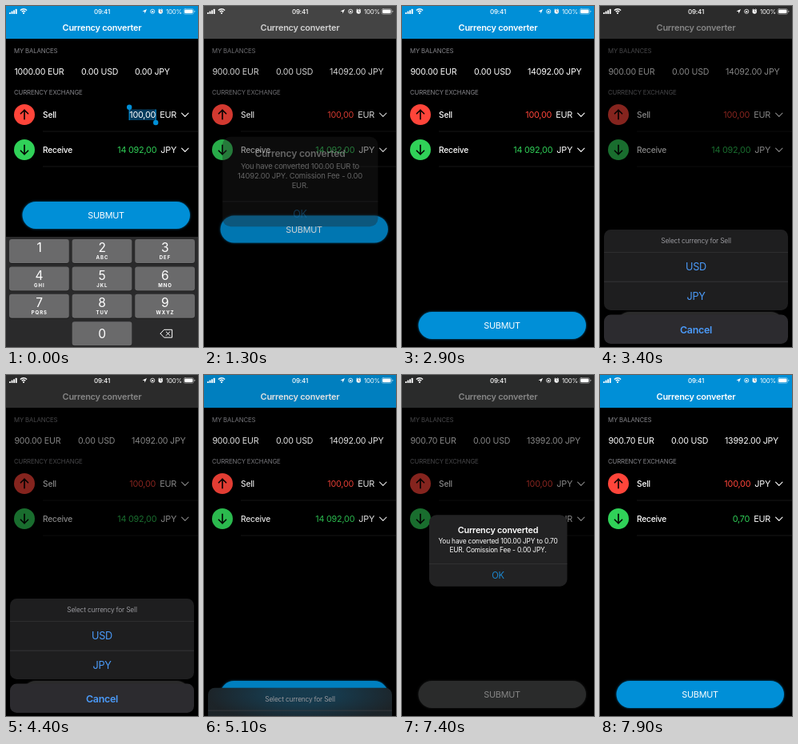
Animation, 240 px wide and 427 px high, one loop 8000 ms. Source, as an HTML page with a canvas:

```html
<!DOCTYPE html>
<html lang="en">
<head>
<meta charset="utf-8">
<title>Currency converter</title>
<style>
html, body { margin: 0; width: 100%; height: 100%; overflow: hidden; background: #000; }
canvas { display: block; width: 240px; height: 427px; }
</style>
</head>
<body>
<canvas id="stage"></canvas>
<script>
const W = 240, H = 427, LOOP = 8000;
const canvas = document.getElementById('stage');
const ctx = canvas.getContext('2d');
const dpr = window.devicePixelRatio || 1;
canvas.width = Math.round(W * dpr);
canvas.height = Math.round(H * dpr);

const BLUE = [0, 143, 215], GRAY = [82, 82, 82];
const RED = '#ff453a', GREEN = '#30d158';

const ramp = (t, a, b) => Math.min(1, Math.max(0, (t - a) / (b - a)));
const inOut = x => x < .5 ? 2 * x * x : 1 - 2 * (1 - x) ** 2;
const out = x => 1 - (1 - x) ** 3;
const rgb = (c, alpha = 1) => `rgba(${c},${alpha})`;
const mix = (a, b, p) => a.map((v, i) => Math.round(v + (b[i] - v) * p));

// Spans are [open start, open end, close start, close end]
const ALERTS = [
  { span: [1130, 1530, 2200, 2600],
    lines: ['You have converted 100.00 EUR to', '14092.00 JPY. Comission Fee - 0.00', 'EUR.'] },
  { span: [6280, 6680, 7400, 7800],
    lines: ['You have converted 100.00 JPY to 0.70', 'EUR. Comission Fee - 0.00 JPY.'] }
];
const SHEET = [3040, 3390, 4800, 5260];

const BALANCES = [
  { until: 1100, items: [['1000.00 EUR', 10.5], ['0.00 USD', 94], ['0.00 JPY', 161]] },
  { until: 6250, items: [['900.00 EUR', 10.5], ['0.00 USD', 90], ['14092.00 JPY', 157]] },
  { until: LOOP, items: [['900.70 EUR', 10.5], ['0.00 USD', 89], ['13992.00 JPY', 156]] }
];

function text(str, x, y, size, { color = '#fff', weight = 400, align = 'left', track = -.02 } = {}) {
  ctx.font = `${weight} ${size}px Inter, sans-serif`;
  ctx.letterSpacing = `${track * size}px`;
  ctx.textAlign = align;
  ctx.fillStyle = color;
  ctx.fillText(str, x, y + size * .364);
  return ctx.measureText(str).width;
}

function rect(x, y, w, h, color, r = 0) {
  ctx.fillStyle = color;
  ctx.beginPath();
  ctx.roundRect(x, y, w, h, r);
  ctx.fill();
}

function disc(x, y, r, color) {
  ctx.fillStyle = color;
  ctx.beginPath();
  ctx.arc(x, y, r, 0, 7);
  ctx.fill();
}

function arc(x, y, r, width, from = 0, to = 7) {
  ctx.strokeStyle = '#fff';
  ctx.lineWidth = width;
  ctx.lineCap = 'butt';
  ctx.beginPath();
  ctx.arc(x, y, r, from, to);
  ctx.stroke();
}

function line(points, width, color = '#fff') {
  ctx.strokeStyle = color;
  ctx.lineWidth = width;
  ctx.lineCap = ctx.lineJoin = 'round';
  ctx.beginPath();
  points.forEach(([x, y]) => ctx.lineTo(x, y));
  ctx.stroke();
}

function statusBar() {
  for (let i = 0; i < 4; i++) rect(4 + i * 2.6, 8 - i * 1.4, 1.9, 2 + i * 1.4, '#fff', .4);
  for (const r of [3.2, 5.8]) arc(22, 9.6, r, 1.4, -2.36, -.78);
  disc(22, 9, 1.1, '#fff');
  text('09:41', 120, 7, 8, { weight: 500, align: 'center' });

  ctx.fillStyle = '#fff';
  ctx.beginPath();
  [[176, 4], [170.5, 6.6], [173.1, 6.9], [173.5, 9.5]].forEach(([x, y]) => ctx.lineTo(x, y));
  ctx.fill();
  arc(183.2, 6.8, 2.6, .8);
  rect(182.1, 6.2, 2.2, 1.8, '#fff', .3);
  disc(193.2, 7, 2.7, '#fff');
  line([[190.7, 4.8], [191.7, 4]], 1);
  line([[195.7, 4.8], [194.7, 4]], 1);
  line([[193.2, 5.4], [193.2, 7.1], [194.3, 7.5]], .6, '#333');

  text('100%', 220, 7, 7.8, { align: 'right' });
  ctx.strokeStyle = 'rgba(255,255,255,.5)';
  ctx.lineWidth = .7;
  ctx.beginPath();
  ctx.roundRect(222, 3.5, 12.6, 6.8, 2);
  ctx.stroke();
  rect(223.1, 4.6, 10.4, 4.6, '#fff', 1.1);
  rect(235.3, 5.8, .9, 2.2, 'rgba(255,255,255,.6)', .5);
}

function selection(right, y) {
  const left = right - 33, blue = rgb(BLUE);
  rect(left, y - 6.5, 33, 13.5, '#053c5e');
  rect(left - .6, y - 8, 1.2, 15, blue);
  rect(right - .6, y - 6.5, 1.2, 15, blue);
  disc(left, y - 9.2, 3.2, blue);
  disc(right, y + 10, 3.2, blue);
}

function row(y, label, color, dir, amount, currency, selected) {
  disc(23, y, 13, color);
  line([[23, y + 5.7 * dir], [23, y - 5.7 * dir]], 1.6, '#000');
  line([[18.4, y - 1.2 * dir], [23, y - 5.7 * dir], [27.6, y - 1.2 * dir]], 1.6, '#000');
  text(label, 46, y, 10.2, { weight: 500 });
  const right = 208 - text(currency, 213, y, 10.8, { align: 'right' });
  if (selected) selection(right, y);
  text(amount, right, y, 10.8, { align: 'right', color: selected ? '#fff' : color });
  line([[219.6, y - 1.8], [223.8, y + 2.3], [228, y - 1.8]], 1.1);
  rect(46, y + 20.7, 194, .6, '#2c2c2e');
}

function submitButton(y, color) {
  ctx.save();
  ctx.shadowColor = rgb(color, .7);
  ctx.shadowBlur = 3 * dpr;
  rect(20.5, y - 17, 209.5, 34, rgb(color), 17);
  ctx.restore();
  text('SUBMUT', 125, y, 10.8, { align: 'center' });
}

function keyboard(offset) {
  ctx.save();
  ctx.translate(0, offset);
  rect(0, 289, W, 138, '#2a2a2b');
  const letters = ['', 'ABC', 'DEF', 'GHI', 'JKL', 'MNO', 'PQRS', 'TUV', 'WXYZ'];
  const key = (col, r, digit, sub) => {
    const x = 4 + col * 78.6, y = 292 + r * 34.4;
    rect(x, y + .8, 74.8, 30, '#161616', 3.2);
    rect(x, y, 74.8, 30, '#6a6a6b', 3.2);
    text(digit, x + 37.4, y + (r === 3 ? 15 : 10.8), 15.5, { align: 'center' });
    if (sub) text(sub, x + 37.8, y + 23.3, 6, { weight: 700, align: 'center', track: .16 });
  };
  letters.forEach((sub, i) => key(i % 3, Math.floor(i / 3), String(i + 1), sub));
  key(1, 3, '0');
  line([[193, 410.2], [197.6, 405.3], [207.6, 405.3], [207.6, 415.1], [197.6, 415.1], [193, 410.2]], 1);
  line([[200.2, 407.9], [204.8, 412.5]], 1);
  line([[204.8, 407.9], [200.2, 412.5]], 1);
  ctx.restore();
}

function alertBox(lines, opened, alpha) {
  const h = 68.5 + lines.length * 10.5, scale = 1.2 - .2 * opened;
  ctx.save();
  ctx.globalAlpha = alpha;
  ctx.translate(120, 220);
  ctx.scale(scale, scale);
  ctx.translate(-86, -h / 2);
  rect(0, 0, 172.5, h, '#222223', 9);
  text('Currency converted', 86, 19, 10.8, { weight: 600, align: 'center' });
  lines.forEach((s, i) => text(s, 86, 33 + i * 10.5, 8.4, { align: 'center' }));
  rect(0, h - 28.3, 172.5, .6, '#414143');
  text('OK', 86, h - 14, 11.2, { align: 'center', color: '#1c87cf' });
  ctx.restore();
}

function actionSheet(p, blueness) {
  const option = { align: 'center', color: '#4b9bfa' };
  const shift = 147 * (1 - p);
  ctx.save();
  ctx.translate(0, shift);
  rect(5, 280, 230, 101, '#1e1e1f', 8.5);

  // The button behind glows softly through the panel.
  ctx.save();
  ctx.clip();
  ctx.translate(125, 400 - shift);
  ctx.scale(1, .3);
  const glow = ctx.createRadialGradient(0, 0, 40, 0, 0, 120);
  glow.addColorStop(0, rgb(BLUE, .25 * blueness));
  glow.addColorStop(1, rgb(BLUE, .05 * blueness));
  rect(-W, -2000, 2 * W, 4000, glow);
  ctx.restore();

  text('Select currency for Sell', 120, 294, 8.3, { align: 'center', color: '#98989d' });
  rect(5, 308, 230, .6, '#3d3d40');
  text('USD', 120, 326.5, 12.7, option);
  rect(5, 344.8, 230, .6, '#3d3d40');
  text('JPY', 120, 363.5, 12.7, option);
  rect(5, 386.5, 230, 36.5, '#2c2b2f', 8.5);
  text('Cancel', 120, 405, 12.4, { ...option, weight: 600 });
  ctx.restore();
}

function render(t) {
  ctx.setTransform(dpr, 0, 0, dpr, 0, 0);
  rect(0, 0, W, H, '#000');

  const alerts = ALERTS.map(({ lines, span: [a, b, c, d] }) => {
    const opened = inOut(ramp(t, a, b));
    return { lines, opened, alpha: opened - inOut(ramp(t, c, d)) };
  });
  const sheet = out(ramp(t, SHEET[0], SHEET[1])) - inOut(ramp(t, SHEET[2], SHEET[3]));
  const grayness = (start, end) => ramp(t, start, start + 100) - ramp(t, end, end + 90);
  const later = grayness(SHEET[0], SHEET[2]) + grayness(6280, 7400);
  const navGray = later + grayness(1130, 2200);
  const buttonGray = later + grayness(1450, 2200);

  rect(0, 0, W, 41, rgb(mix(BLUE, GRAY, navGray)));
  text('Currency converter', 120, 27, 10.9, { weight: 600, align: 'center' });

  const label = { color: '#85858a' };
  text('MY BALANCES', 10, 56, 7.8, label);
  text('CURRENCY EXCHANGE', 10, 108.5, 7.8, label);
  BALANCES.find(b => t < b.until).items.forEach(([s, x]) => text(s, x, 82.5, 10.6));

  const swapped = t >= 5300;
  row(136, 'Sell', RED, 1, '100,00', swapped ? 'JPY' : 'EUR', t < 1050);
  row(180, 'Receive', GREEN, -1, swapped ? '0,70' : '14 092,00', swapped ? 'EUR' : 'JPY');

  submitButton(262 + 138 * inOut(ramp(t, 1200, 1600)), mix(BLUE, GRAY, buttonGray));

  const hide = inOut(ramp(t, 1000, 1250));
  if (hide < 1) keyboard(138 * hide);

  const dim = .48 * Math.max(sheet, ...alerts.map(a => a.alpha));
  rect(0, 0, W, H, `rgba(0,0,0,${dim})`);
  statusBar();

  for (const a of alerts) if (a.alpha > 0) alertBox(a.lines, a.opened, a.alpha);
  if (sheet > 0) actionSheet(sheet, 1 - navGray);
}

function tick() {
  render(performance.now() % LOOP);
  requestAnimationFrame(tick);
}
tick();
</script>
</body>
</html>
```
